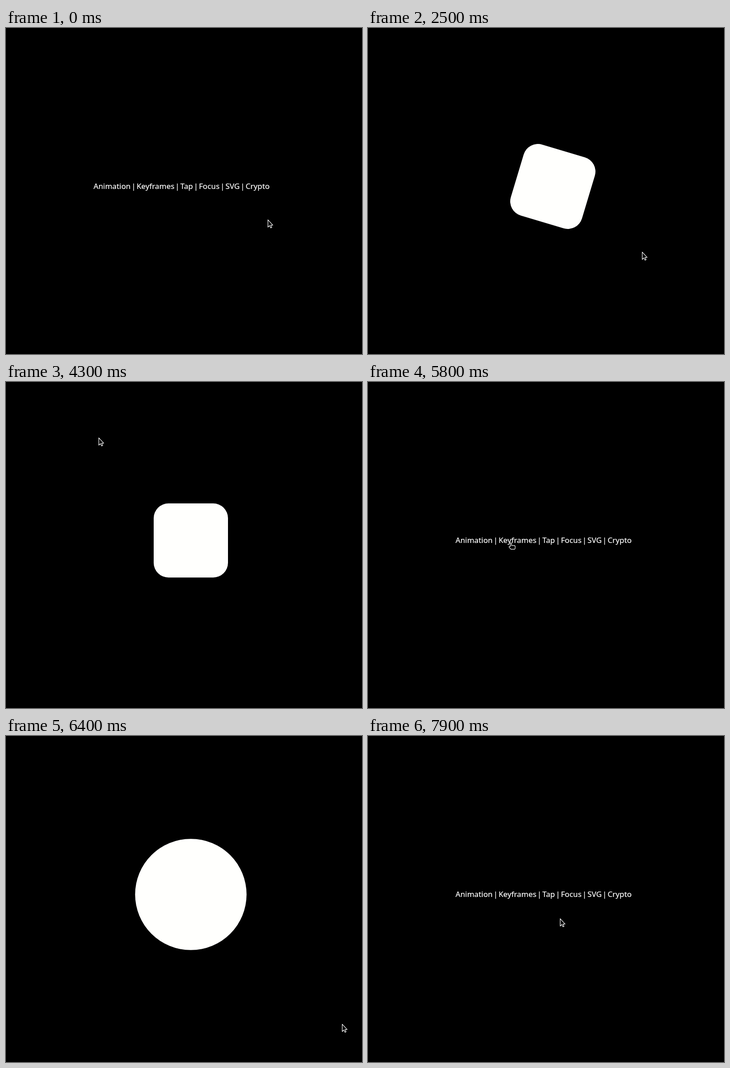
Recreate the animation shown at these times as an HTML page. Size 781 by 717 pixels, loop 8 s.

```html
<!DOCTYPE html>
<html lang="en">
<head>
<meta charset="utf-8">
<title>Motion demo</title>
<style>
  html, body { margin: 0; width: 100%; height: 100%; overflow: hidden; background: #000; }
  svg { display: block; width: 781px; height: 717px; }
  #menu {
    font: 16.8px "Noto Sans", "Open Sans", sans-serif;
    word-spacing: -2.5px;
    fill: #fff;
    stroke: #fff;
    stroke-width: .2;
  }
  #box { fill: #fffffd; }
  .pointer { fill: #000; stroke: #fff; stroke-width: 1.2; stroke-linejoin: round; }
</style>
</head>
<body>
<svg viewBox="0 0 781 717">
  <text id="menu" x="192" y="354">Animation | Keyframes | Tap | Focus | SVG | Crypto</text>
  <rect id="box" x="-81.5" y="-81.5" width="163" height="163"/>
  <g id="cursor">
    <path id="arrow" class="pointer" d="M.6 .8V17L4.2 13.6 6.6 18.6 9 17.6 6.8 12.6H11.4Z"/>
    <path id="hand" class="pointer" transform="translate(-4 0)"
      d="M3.4 8.4V2Q3.4 .6 4.7 .6T6 2V6.6H12Q13.8 6.8 13.8 8.6V13L12.8 14.8H4.6L.6 10.4Q.2 8.6 2 8.4Z"/>
  </g>
</svg>
<script>
const LOOP = 8000, STEP = 100, SIDE = 163;
const SPIN = 1730, MORPH = 5900;
const $ = id => document.getElementById(id);
const menu = $('menu'), box = $('box'), cursor = $('cursor'), arrow = $('arrow'), hand = $('hand');

const within = (v, a, b) => v >= a && v < b;
const clamp = p => Math.min(1, Math.max(0, p));
const mix = (a, b, p) => a + (b - a) * p;
const ease = p => p < .5 ? 2 * p * p : 1 - 2 * (1 - p) ** 2;
const show = (el, on) => el.style.display = on ? '' : 'none';

// The pointer rests between moves
const move = (from, to, x, y) => ({ from, to, x, y });
const moves = [
  move(100, 600, 493, 396),
  move(600, 1000, 548, 358),
  move(1000, 1500, 202, 347),
  move(1800, 2600, 658, 513),
  move(4100, 4300, 203, 122),
  move(5000, 5300, 225, 149),
  move(5400, 5800, 313, 353),
  move(5900, 6300, 737, 633),
  move(6400, 7100, 664, 564),
  move(7600, 7900, 421, 401)
];

function pointerAt(t) {
  let x = 574, y = 421;
  for (const m of moves) {
    const p = clamp((t - m.from) / (m.to - m.from));
    x = mix(x, m.x, p);
    y = mix(y, m.y, p);
  }
  return [Math.round(x), Math.round(y)];
}

// Evenly spaced keyframes, each segment eased
function keyed(values, p) {
  const pos = clamp(p) * (values.length - 1);
  const i = Math.min(Math.floor(pos), values.length - 2);
  return mix(values[i], values[i + 1], ease(pos - i));
}

function boxAt(t) {
  if (t < 5000) return { scale: 1, turn: 360 * ease(clamp((t - SPIN) / 2000)), round: .2 };
  const p = (t - MORPH) / 800;
  return {
    scale: keyed([1, 2, 2, 1, 1], p),
    turn: keyed([0, 0, 270, 270, 0], p),
    round: keyed([.2, .2, .5, .5, .2], p)
  };
}

function draw(t) {
  const boxOn = within(t, 1800, 5000) || within(t, MORPH, 7500);
  show(menu, !boxOn);
  show(box, boxOn);
  const { scale, turn, round } = boxAt(t);
  box.setAttribute('rx', SIDE * round);
  box.setAttribute('transform', `translate(405.5 348.5) rotate(${turn}) scale(${scale})`);

  const [x, y] = pointerAt(t);
  cursor.setAttribute('transform', `translate(${x} ${y})`);
  const onLink = !boxOn && within(x, 192, 580) && within(y, 338, 357);
  show(hand, onLink);
  show(arrow, !onLink);
}

// The scene advances ten times a second
const start = performance.now();
function tick() {
  const t = (performance.now() - start) % LOOP;
  draw(Math.floor(t / STEP) * STEP);
  requestAnimationFrame(tick);
}
tick();
</script>
</body>
</html>
```
